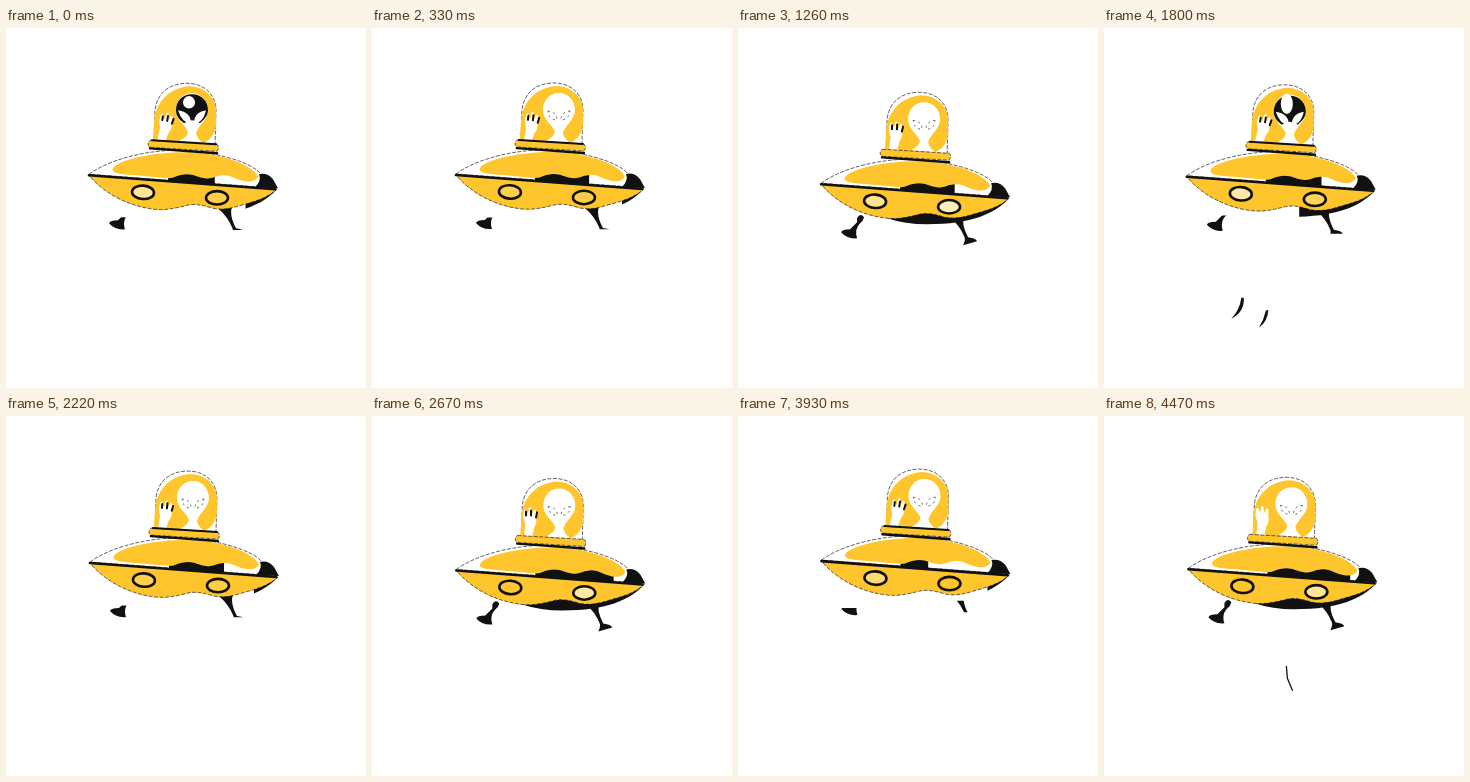
Write an HTML page that moves like this. It is 360x360 px and loops after 4.5 s.

```html
<!DOCTYPE html>
<html>
<head>
<meta charset="utf-8">
<style>
html, body { margin: 0; width: 100%; height: 100%; overflow: hidden; background: #fff; }
svg { display: block; width: 100vw; height: 100vh; }
.y { fill: #ffc52c; }
.k { fill: #111; }
.w { fill: #fff; }
.thin { stroke: #222; stroke-width: .7; stroke-dasharray: 4 1.5; }
.line { fill: none; stroke: #111; stroke-linecap: round; stroke-linejoin: round; }
.win { stroke: #111; stroke-width: 2.6; }
</style>
</head>
<body>
<svg viewBox="0 0 360 360">
  <defs>
    <clipPath id="waveClip"><rect id="waveBox" x="150" y="140" height="40"/></clipPath>
    <clipPath id="shadeClip"><rect id="shadeBox" y="160" width="140" height="40"/></clipPath>
    <clipPath id="footClip"><rect id="footBox" x="95" width="40" height="40"/></clipPath>
    <clipPath id="legClip"><rect id="legBox" x="205" width="45"/></clipPath>
  </defs>
  <g id="ship">
    <path class="k" clip-path="url(#footClip)" d="M120 187Q123 181 127 186Q126 190 123 192Q117 198 120 207Q110 208 104 201Q105 198 113 198L120 191Z"/>
    <path class="k" clip-path="url(#legClip)" d="M213 186L227 185Q224 193 231 206Q239 207 240 210L226 214Q229 208 227 205Q223 195 213 186Z"/>

    <path class="w thin" d="M149 120L150 88C152 70 165 61 182 61C200 61 211 73 211 88L210 123Z"/>
    <path class="y" d="M148 119L149 100C150 82 162 66 184 64C200 64 211 76 211 88L211 104C209 113 205 118 198 121Z"/>
    <g id="arm">
      <path class="w" d="M152 119L153 106Q150 100 152 92L154 92L156 97L157 90L159 90L160 97L162 92L164 93L164 101Q165 106 162 110L160 119Z"/>
      <path id="fingers" class="line" stroke-width="2" d="M154 98V94M159 98V93M164 100L165 95"/>
    </g>
    <path class="w" d="M187 71C197 71 203 79 203 88C203 98 193 103 191 111Q192 116 198 121L174 119Q182 115 183 110C181 103 171 98 171 88C171 79 177 71 187 71Z"/>
    <g id="face">
      <path class="k" d="M187 72C197 72 203 79 203 88C203 94 198 98 195 101Q187 95 179 101C175 98 171 94 171 88C171 79 177 72 187 72Z"/>
      <ellipse id="shine" class="w" cx="184" cy="80" rx="6"/>
      <path class="w" d="M173 88Q186 90 186 101Q177 101 173 88ZM201 88Q189 90 189 101Q198 101 201 88Z"/>
    </g>
    <path id="eyes" class="line" stroke-width=".6" stroke-dasharray="1.5 4" d="M176 89Q185 90 185 98Q177 98 176 89ZM198 89Q189 90 189 98Q197 98 198 89Z"/>

    <path class="w thin" d="M84 152C100 140 130 130 165 128C205 127 248 140 256 152L272 166Z"/>
    <path class="y" d="M108 146C113 138 145 130 180 130C215 130 246 142 253 154C252 158 247 160 240 159C230 157 226 152 217 153C208 154 207 157 200 156C192 155 190 152 182 152C172 152 170 156 163 156L130 153C112 152 106 150 108 146Z"/>
    <path class="k" clip-path="url(#waveClip)" d="M163 156C170 156 172 152 182 152C190 152 192 155 200 156C207 157 208 154 217 153C226 152 230 157 240 159Q252 160 252 153L272 166L163 160Z"/>
    <path class="k" d="M254 152Q262 150 268 157L273 166L250 165Q257 158 254 152Z"/>

    <path class="line" stroke-width="2.6" d="M145 126L212 131"/>
    <path class="y thin" d="M145 118L212 122Q215 125 212 129L145 125Q141 122 145 118Z"/>
    <path id="seam" class="line" stroke-width="2" d="M147 118L211 122"/>

    <path class="y thin" d="M84 153L272 167C262 176 250 179 236 183C226 186 218 188 208 186C198 183 190 181 182 183C170 186 162 188 150 187C122 184 98 170 84 153Z"/>
    <path class="k" clip-path="url(#shadeClip)" d="M150 187C162 188 170 186 182 183C190 181 198 183 208 186C218 188 226 186 236 183C250 179 262 176 272 167C258 182 235 193 190 193Q168 193 150 187Z"/>
    <path class="line" stroke-width="2.6" d="M84 153L270 167"/>
    <ellipse id="winL" class="win" cx="138" cy="170" rx="11" ry="6.7" transform="rotate(4 138 170)"/>
    <ellipse id="winR" class="win" cx="212" cy="175.5" rx="11" ry="6.7"/>

    <path id="ray" class="line" stroke-width="1.3" d="M182 250L183 262L188 274"/>
    <path id="marks" class="k" d="M138.500 274L141 274Q142 288 128.500 295Q137 286 138.500 274ZM163 287L165.500 286Q165 298 156 304Q161 296 163 287Z"/>
  </g>
</svg>
<script>
const LOOP = 4500, STEP = 30, BOB = 1885, LEAD = 1710;
const TURN = 2 * Math.PI;
const el = id => document.getElementById(id);

const set = (id, attrs) => {
  for (const name in attrs) el(id).setAttribute(name, attrs[name]);
};
const show = (id, on) => set(id, { visibility: on ? 'visible' : 'hidden' });
const clamp = (v, lo, hi) => Math.min(hi, Math.max(lo, v));
const glow = a => `rgb(255,${197 + 46 * a},${44 + 150 * a})`;

function draw(t) {
  // u: share of one bob, 0 at the highest point; y: drop below it
  const u = (t + LEAD) % BOB / BOB;
  const sway = Math.sin(TURN * u);
  const y = 11.7 * Math.sin(Math.PI * u) ** 1.3;
  set('ship', { transform: `translate(${0.9 * sway - 0.5} ${y - 8})` });

  // Dark areas open and close with the height of the ship
  set('waveBox', { width: 40 + 13 * y - 0.9 * y * y + 10 * sway });
  set('shadeBox', { x: clamp(310 - 30 * y, 150, 250) });
  set('footBox', { y: 200 - 2.2 * y });
  set('legBox', { y: 193 - 4 * y, height: 11 + 5.6 * y });

  const face = u > 0.77 && u < 0.965;
  const ray = u > 0.206 && u < 0.308;
  show('face', face);
  show('eyes', !face);
  show('ray', ray);
  show('fingers', !ray);
  show('seam', y < 7);
  show('marks', u > 0.706 && u < 0.883);

  set('arm', { transform: `rotate(${4 + 5 * Math.cos(TURN * (u - 0.88))} 157 119)` });
  set('shine', { ry: Math.max(6, 2.7 * y) });
  set('winL', { fill: glow(0.45 - 0.45 * sway) });
  set('winR', { fill: glow(y / 12) });
}

const start = performance.now();
function frame() {
  const t = (performance.now() - start) % LOOP;
  draw(Math.floor(t / STEP) * STEP);
  requestAnimationFrame(frame);
}
frame();
</script>
</body>
</html>
```
